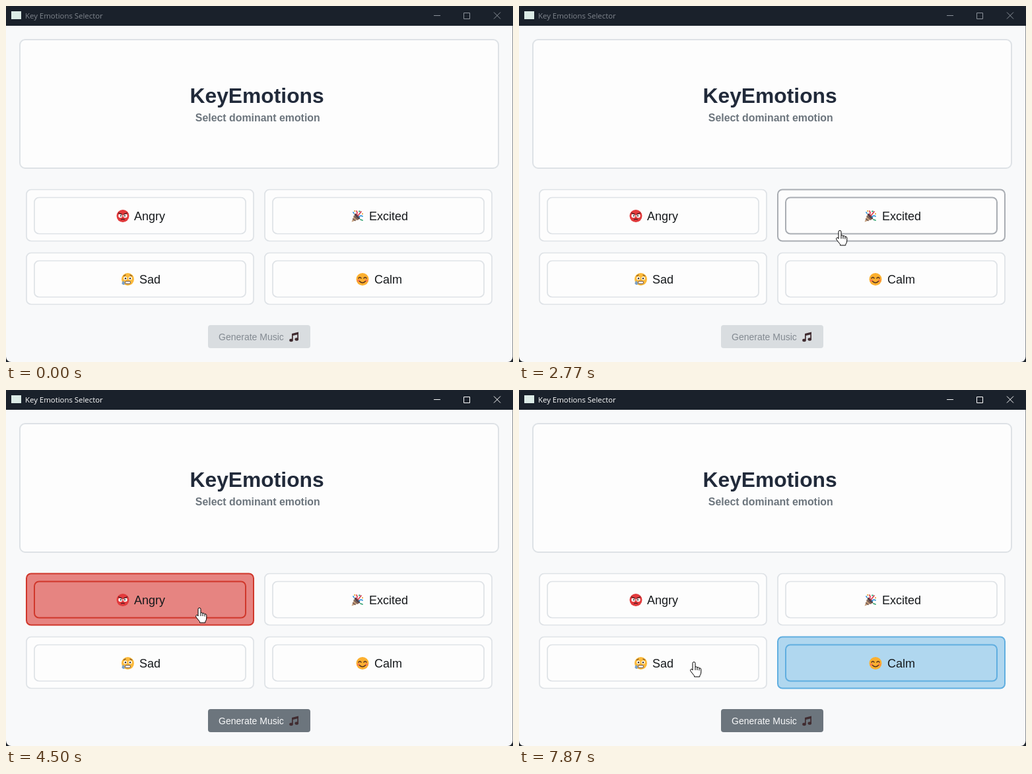
Write an HTML page that moves like this. It is 768 px wide and 540 px high and loops after 8 s.

```html
<!DOCTYPE html>
<html lang="en">
<head>
<meta charset="utf-8">
<title>Key Emotions Selector</title>
<style>
  html, body { margin: 0; width: 100%; height: 100%; overflow: hidden; background: #20262e; }
  svg { display: block; width: 768px; height: 540px; }
  text { font-family: "Liberation Sans", Arial, sans-serif; fill: #16191c; }
  .bold { font-weight: bold; }
  .label { font-size: 18px; }
  .line { fill: none; stroke-linecap: round; }
</style>
</head>
<body>
<svg viewBox="0 0 768 540">
  <!-- window -->
  <path d="M0 30H767.5V532a8 8 0 0 1-8 8H8a8 8 0 0 1-8-8z" fill="#f8f9fa"/>
  <path d="M0 30V8a8 8 0 0 1 8-8H760a8 8 0 0 1 8 8V30z" fill="#1a212b"/>
  <rect x="8" y="8" width="15" height="12" fill="#dcebe6"/>
  <text id="caption" x="29" y="19" style="font:11.4px 'Open Sans','Noto Sans',sans-serif">Key Emotions Selector</text>
  <path id="controls" d="M648 14.5h10M693.5 10.5h9v9h-9zM739 9.5l10 10m0-10l-10 10" fill="none"/>

  <!-- heading -->
  <rect id="hero" x="21" y="51" width="725" height="195" rx="8" fill="#fdfdfd" stroke-width="2"/>
  <text class="bold" x="278.5" y="147" font-size="31.8" style="fill:#212a3a">KeyEmotions</text>
  <text class="bold" x="286.8" y="175" font-size="15.9" style="fill:#6c757d">Select dominant emotion</text>

  <g id="cards"></g>

  <!-- angry face -->
  <g transform="translate(177 318.5)">
    <circle r="9.5" fill="#e23a3c"/>
    <g fill="#fff"><circle cx="-3.7" cy="-.3" r="3"/><circle cx="3.7" cy="-.3" r="3"/></g>
    <g fill="#30201c"><circle cx="-3" cy="-.2" r="1.1"/><circle cx="3" cy="-.2" r="1.1"/></g>
    <path class="line" d="M-6.5-4.500l5 2M6.500-4.500l-5 2M-2.500 5.500q2.500-1.500 5 0" stroke="#5a1c20" stroke-width="1.400"/>
  </g>
  <!-- party popper -->
  <g transform="translate(532 319)">
    <path d="M-8.500 8.500L-3.500-4Q2-2 4.500 4z" fill="#c09a78"/>
    <path class="line" d="M-6.500 4l3.500 2.500M-5 0l6 5" stroke="#6a5450" stroke-width="1.4"/>
    <ellipse rx="2.200" ry="5.300" transform="rotate(-45)" fill="#504048"/>
    <path class="line" d="M-1-3q2-2 0-5M1-1Q3-3 6-7" stroke="#dc3c50" stroke-width="1.700"/>
    <path class="line" d="M3 1q2-3 5-1M-6-6l1 1.500" stroke="#3294dc" stroke-width="1.700"/>
    <path class="line" d="M5 5l3 1M3-7.500h1" stroke="#30a070" stroke-width="1.800"/>
    <path class="line" d="M8-4v.5M-4-8h.5" stroke="#e8a030" stroke-width="1.800"/>
  </g>
  <!-- worried face -->
  <g transform="translate(184.500 414.500)">
    <circle r="9.500" fill="#fcba3c"/>
    <g fill="#fff"><circle cx="-3.700" cy="-1.500" r="2.600"/><circle cx="3.700" cy="-1.500" r="2.600"/></g>
    <g fill="#3a2c20"><circle cx="-3.500" cy="-1.300" r="1.200"/><circle cx="3.500" cy="-1.300" r="1.200"/></g>
    <path class="line" d="M-6.500-5q2-.3 3-1.500M6.500-5q-2-.3-3-1.500" stroke="#8a5a20" stroke-width="1.200"/>
    <rect x="-4" y="3" width="8" height="3.800" rx="1.500" fill="#f4f0ec" stroke="#705848"/>
    <path d="M-7 2q4 4 1.500 6.500q-4-.5-3.500-3z" fill="#78a0c8"/>
  </g>
  <!-- smiling face -->
  <g transform="translate(540 414.500)">
    <circle r="9.500" fill="#fcb030"/>
    <g fill="#f87c50"><circle cx="-6" cy="2" r="2"/><circle cx="6" cy="2" r="2"/></g>
    <path class="line" d="M-6-1.500q2-3 4 0M2-1.500q2-3 4 0M-4.500 3q4.500 4.500 9 0" stroke="#523020" stroke-width="1.500"/>
  </g>
  <text class="label" x="194" y="325">Angry</text>
  <text class="label" x="550" y="325">Excited</text>
  <text class="label" x="202" y="421">Sad</text>
  <text class="label" x="558" y="421">Calm</text>

  <!-- action button -->
  <rect id="button" x="306" y="484" width="155" height="35" rx="4"/>
  <text id="action" x="322" y="507" font-size="14">Generate Music</text>
  <g fill="#402c30">
    <path d="M433 497l10-2.500v3.500l-8.300 2v6.500H433zM441.300 497H443v8.500h-1.700z"/>
    <ellipse cx="432" cy="507" rx="2.800" ry="2.300"/><ellipse cx="440.300" cy="505.500" rx="2.800" ry="2.300"/>
  </g>

  <g id="cursor" fill="#fff" stroke="#000" stroke-linejoin="round">
    <path id="arrow" d="M.5.500V17l3.900-3.600 2.600 6 2.600-1.100-2.600-5.800h5.200z"/>
    <g id="hand">
      <path d="M-2 13V2.500a2 2 0 0 1 4 0V8q2-1 3 .8q2.500-.8 3 1q2.800-.3 2.800 2V16q0 3-2 5.500V23H.500V21.500L-5 14.500q-1-2 .5-3t2.500 1.500z"/>
      <path d="M2 8v5M5 9v4M8 10v3.500" fill="none"/>
    </g>
  </g>
</svg>
<script>
const $ = id => document.getElementById(id);
const LOOP = 8000, ACTIVE = 4200, FIRST = 4230;
const PLAIN = '#fdfdfd', LINE = '#dee2e6', HOVER = '#a9adb3';

// Each card is selected from on to off (ms).
const cards = [
  { x: 31, y: 278.5, on: FIRST, off: 5630, fill: '#e68481', line: '#d0372b' },
  { x: 392, y: 278.5, on: 5630, off: 7130, fill: '#fcf190', line: '#fbdf10' },
  { x: 31, y: 374.5 },
  { x: 392, y: 374.5, on: 7130, off: LOOP, fill: '#b0d7ef', line: '#60aee0' }
];

// Pointer keys: time, x, y
const path = [
  [0, 560, -24], [30, 560, -24], [350, 450, 95], [670, 391, 171], [940, 391, 171], [970, 382, 187],
  [1030, 362, 207], [1300, 362, 207], [1730, 260, 344], [1840, 260, 344],
  [2230, 245, 412], [2340, 245, 412], [2770, 486, 340],
  [3170, 545, 418], [3470, 245, 420], [3640, 245, 420],
  [3970, 293, 331], [4030, 293, 330], [4500, 293, 330], [4700, 301, 331],
  [4940, 301, 331], [5200, 513, 315], [5970, 513, 315], [6430, 519, 410],
  [7100, 519, 410], [7200, 525, 415], [7500, 525, 415], [7870, 265, 412], [LOOP, 265, 412]
];

function addRect(x, y, width, height, rx) {
  const r = document.createElementNS('http://www.w3.org/2000/svg', 'rect');
  for (const [k, v] of Object.entries({ x, y, width, height, rx })) r.setAttribute(k, v);
  return $('cards').appendChild(r);
}
for (const c of cards)
  c.rects = [addRect(c.x, c.y, 344, 78, 7), addRect(c.x + 12, c.y + 12, 320, 55, 7)];

const inside = (p, x, y, w, h) => p[0] >= x && p[0] <= x + w && p[1] >= y && p[1] <= y + h;
const same = (a, b) => a[1] === b[1] && a[2] === b[2];

function slope(i, axis) {
  const a = path[i - 1], b = path[i], c = path[i + 1];
  if (!a || !c || same(a, b) || same(b, c)) return 0;
  return (c[axis] - a[axis]) / (c[0] - a[0]);
}

// Smooth curve through the keys, at rest where two keys agree.
function pointer(t) {
  let i = 0;
  while (path[i + 1][0] <= t) i++;
  const a = path[i], b = path[i + 1], d = b[0] - a[0], u = (t - a[0]) / d, s = u * u * (3 - 2 * u);
  return [1, 2].map(n => a[n] + (b[n] - a[n]) * s
    + d * u * (1 - u) * ((1 - u) * slope(i, n) - u * slope(i + 1, n)));
}

function draw(now) {
  const t = now % LOOP, p = pointer(t), active = t >= ACTIVE, chosen = t >= FIRST;
  let hand = false;
  for (const c of cards) {
    const over = inside(p, c.x, c.y, 344, 78), hover = over && !chosen;
    const selected = t >= c.on && t < c.off;
    hand ||= over;
    for (const r of c.rects) {
      r.style.fill = selected ? c.fill : PLAIN;
      r.style.stroke = selected ? c.line : hover ? HOVER : LINE;
      r.style.strokeWidth = selected || hover ? 2 : 1.7;
    }
  }
  $('hero').style.stroke = inside(p, 20, 50, 727, 197) && !chosen ? HOVER : LINE;
  $('caption').style.fill = active ? '#fff' : '#80868e';
  $('controls').style.stroke = active ? '#fff' : '#8c929a';
  $('button').style.fill = chosen ? '#6c757d' : '#d9dde0';
  $('action').style.fill = chosen ? '#f8f9fa' : '#838a91';
  $('cursor').setAttribute('transform', `translate(${p.map(Math.round)})`);
  $('arrow').style.display = hand ? 'none' : '';
  $('hand').style.display = hand ? '' : 'none';
}

let start;
function tick(now) {
  start ??= now;
  draw(now - start);
  requestAnimationFrame(tick);
}
draw(0);
requestAnimationFrame(tick);
</script>
</body>
</html>
```
